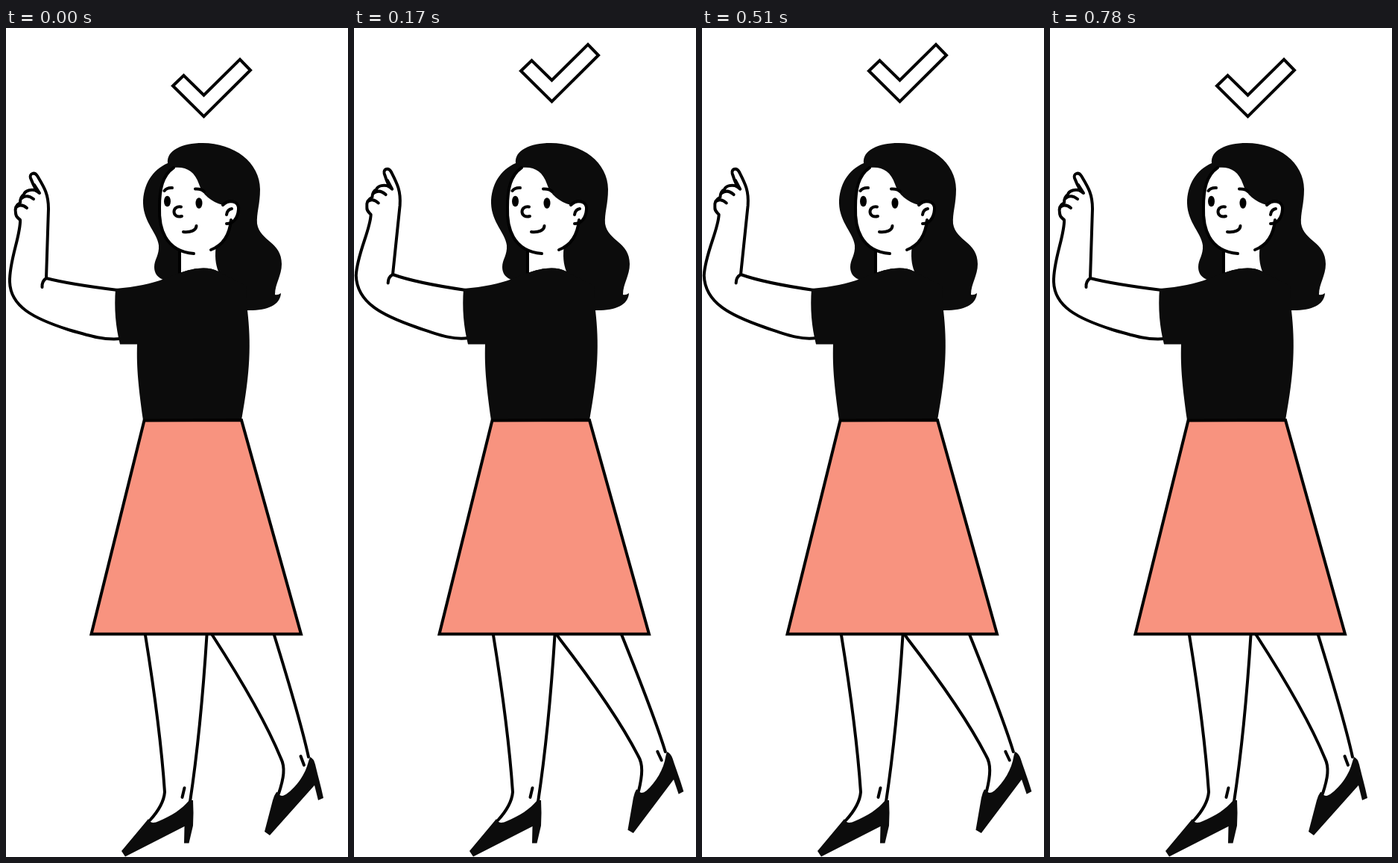
These frames come from a looping animation (459 px wide and 1110 px high, 0.85 s). An HTML page with a canvas:

```html
<!DOCTYPE html>
<html lang="en">
<head>
<meta charset="utf-8">
<title>Woman pointing at a check mark</title>
<style>
  html, body { margin: 0; width: 100%; height: 100%; overflow: hidden; background: #fff; }
  canvas { display: block; width: 459px; height: 1110px; }
</style>
</head>
<body>
<canvas id="stage" width="459" height="1110"></canvas>
<script>
const ctx = document.getElementById('stage').getContext('2d');
const LINE = '#000', INK = '#0c0c0c', WHITE = '#fff', CORAL = '#f8937f';
const STEP = 170;
const CYCLE = [0, 1, 2, 1, 0];
const RAD = Math.PI / 180;

// Forearm shift and turn about the elbow, per pose
const ELBOW = { x: 54, y: 335 };
const FOREARM = [
  { dx: 0, dy: 0, turn: 0 },
  { dx: -2, dy: -5, turn: 4.1 },
  { dx: 3, dy: -15, turn: 7.9 }
];
const HIP = { x: 329, y: 831 };

function shape(d, fill, width = 0) {
  const path = new Path2D(d);
  if (fill) {
    ctx.fillStyle = fill;
    ctx.fill(path);
  }
  if (width) {
    ctx.lineWidth = width;
    ctx.stroke(path);
  }
}

const line = (d, width = 4) => shape(d, null, width);

function turnAbout(p, deg) {
  ctx.translate(p.x, p.y);
  ctx.rotate(deg * RAD);
  ctx.translate(-p.x, -p.y);
}

function check(k) {
  ctx.save();
  ctx.translate(0, -20 * k);
  ctx.lineJoin = 'miter';
  shape('M224 77.5 L238.5 63.5 L265.5 90 L314 42 L328 56.5 L265.5 118.5 Z', WHITE, 4);
  ctx.restore();
}

function backLeg(k) {
  ctx.save();
  turnAbout(HIP, -4.8 * k);
  shape('M262 787 L277 813 C310 864 348 927 369 978 C375 990 373 1004 366 1025 L371 1030 L410 982 L406 976 C396 930 377 868 360 813 L352 787 Z', WHITE);
  line('M262 787 L277 813 C310 864 348 927 369 978 C375 990 373 1004 366 1025');
  line('M352 787 L360 813 C377 868 396 930 406 976');
  line('M395.5 975 L400 987');
  shape('M363 1023 L366 1024 C367 1029 371 1029 376 1026 C390 1016 402 999 406 982 L408 976 Q413 978 415 986 C419 1003 422 1012 426 1031 L419 1034 L414 1014 L354 1081 L347 1076 L358 1034 Q360 1027 363 1023 Z', INK);
  ctx.restore();
}

function frontLeg() {
  shape('M187 805 L187 813 C199 887 208 950 213 1023 C212 1036 204 1049 193 1061 L200 1066 L247 1036 C257 970 264 900 270 813 L270 805 Z', WHITE);
  line('M186 805 L187 813 C199 887 208 950 213 1023 C212 1036 204 1049 193 1061');
  line('M270 805 L269.5 813 C264 900 257 970 247 1036');
  line('M239.5 1017.5 L236.5 1030');
  shape('M191 1059 C193 1065 199 1065 205 1062 C222 1055 236 1046 246 1034 L251 1034 Q252 1050 251 1068 L245.5 1091.5 L239 1091.5 L239.5 1069 L160 1109.5 L155 1102 L181 1071 Z', INK);
}

function skirt() {
  ctx.lineJoin = 'miter';
  shape('M185.5 525.5 L316 525 L396 811.5 L114.5 811.5 Z', CORAL, 4);
  ctx.lineJoin = 'round';
}

function hair() {
  shape('M217 181 C215 164 236 154 264 154 C306 154 341 180 341 216 C341 236 336 248 337 262 C341 286 370 286 370 316 C370 332 361 342 361 357 Q365 358 369 355 C368 372 349 379 322 378 L270 350 L214 338 C203 335 199 328 199 320 C199 310 206 304 205 291 C203 274 185 261 184 235 C184 210 196 190 217 181 Z', INK);
}

function head() {
  shape('M233 298 L233 328 C250 322 270 318 285 326 C281 316 280 305 282 290 Z', WHITE);
  shape('M225 187 C241 185 253 191 259 209 C263 223 276 233 291 237 C299 229 313 231 312 243 C311 256 304 262 297 262 L302 257 C300 277 291 291 275 297 Q266 302 252 302 C213 299 205 267 206 240 C206 216 210 197 225 187 Z', WHITE);
  line('M225 187 C210 197 206 216 206 240 C205 267 213 299 252 302');
  line('M302 257 C300 277 291 291 275 297');
  line('M233 300 L233 328');
  line('M291 237 C299 229 313 231 312 243 C311 256 304 262 296 262');
  line('M296 250 Q297 243 303 242');
  line('M212.5 218 Q216 213.5 223 214');
  line('M254 215.5 Q262 215 266 219');
  line('M235 239.5 C229 238.5 225.5 242 225.5 246 C225.5 251 230 253.5 236 252');
  line('M238 273 C248 274 255 271 255.5 265');
  ctx.fillStyle = LINE;
  for (const [x, y] of [[216.5, 232], [259, 234.5]]) {
    ctx.beginPath();
    ctx.ellipse(x, y, 4.5, 7.3, 0, 0, 2 * Math.PI);
    ctx.fill();
  }
}

function blouse() {
  shape('M147 349 C174 347 196 342 212 336 L233 328 C250 322 270 318 285 326 L322 345 L324 378 C329 422 328 460 316 525 L184 525 C178 482 175 456 176 423.5 L153 423.5 C147 400 145 375 147 349 Z', INK);
}

function arm(k) {
  const { dx, dy, turn } = FOREARM[k];
  const ex = ELBOW.x + dx, ey = ELBOW.y + dy;
  const bend = () => {
    ctx.translate(dx, dy);
    turnAbout(ELBOW, turn);
  };

  // Each part of the outline is traced under its own transform
  ctx.beginPath();
  ctx.moveTo(150, 351);
  ctx.quadraticCurveTo(85 + dx, 343 + dy * 0.35, ex, ey);
  ctx.save();
  bend();
  ctx.lineTo(57, 242);
  ctx.bezierCurveTo(57, 222, 51, 213, 42, 198);
  ctx.bezierCurveTo(38, 192, 31, 195, 33, 201);
  ctx.quadraticCurveTo(36, 209, 41, 218);
  ctx.bezierCurveTo(34, 215, 25, 218, 24, 223);
  ctx.quadraticCurveTo(19, 226, 19, 234);
  ctx.bezierCurveTo(13, 237, 12, 243, 13, 248);
  ctx.bezierCurveTo(13, 253, 16, 254, 19, 257);
  ctx.bezierCurveTo(20, 277, 4, 312, 5, 340);
  ctx.restore();
  ctx.bezierCurveTo(6 - 2 * k, 373 + dy * 0.9, 37 + 2 * k, 389 + dy * 0.75, 84, 404 + dy * 0.65);
  ctx.bezierCurveTo(115, 413 + dy * 0.4, 132, 418, 154, 416 - k);
  ctx.fillStyle = WHITE;
  ctx.fill();
  ctx.lineWidth = 4;
  ctx.stroke();

  ctx.save();
  bend();
  line('M54 335 Q48 339 48.5 347');
  line('M38 210 L45 221 L40 217.5');
  line('M21 228 Q28 222 37 229');
  line('M15 239 Q21 235 28 241');
  ctx.restore();
}

function draw(k) {
  ctx.setTransform(1, 0, 0, 1, 0, 0);
  ctx.fillStyle = WHITE;
  ctx.fillRect(0, 0, 459, 1110);
  ctx.strokeStyle = LINE;
  ctx.lineCap = ctx.lineJoin = 'round';
  check(k);
  backLeg(k);
  frontLeg();
  hair();
  head();
  arm(k);
  blouse();
  skirt();
}

let start;
function tick(now) {
  start ??= now;
  draw(CYCLE[Math.floor((now - start) / STEP) % CYCLE.length]);
  requestAnimationFrame(tick);
}

draw(0);
requestAnimationFrame(tick);
</script>
</body>
</html>
```
